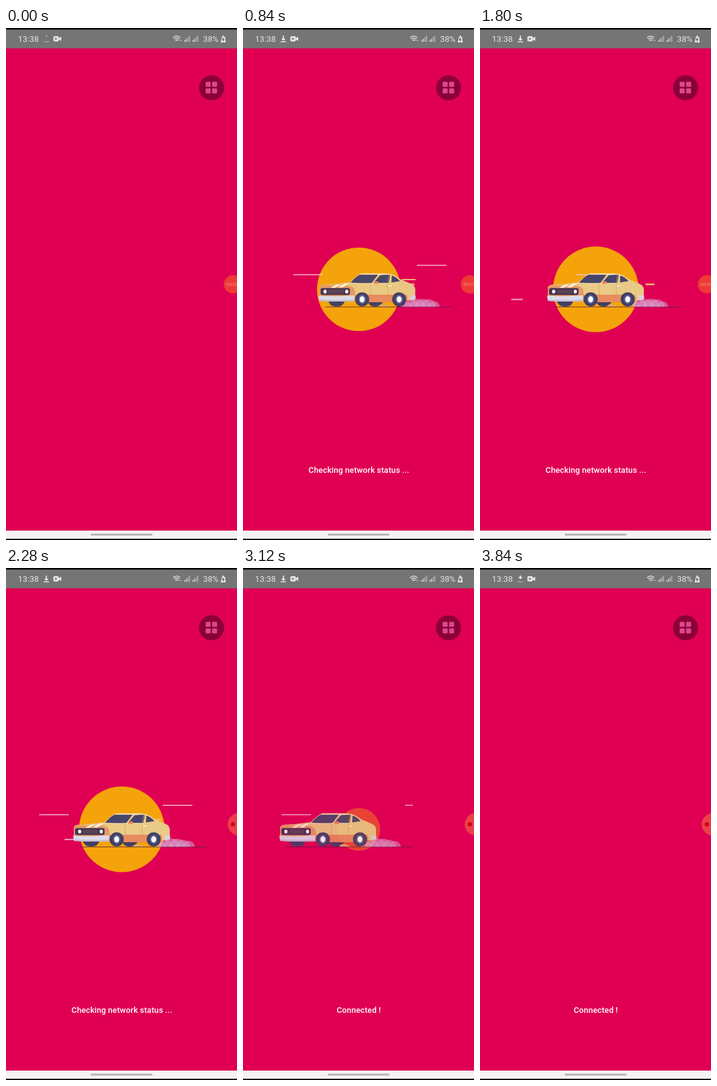
Animation, 368 px wide and 816 px high, one loop 3960 ms. Source, as an HTML page:

```html
<!DOCTYPE html>
<html lang="en">
<head>
<meta charset="utf-8">
<title>Network check</title>
<style>
  html, body { margin: 0; width: 100%; height: 100%; overflow: hidden; background: #e00053; }
  svg { display: block; width: 368px; height: 816px; }
  text { font-family: Roboto, sans-serif; }
  .note { font-size: 13px; font-weight: 500; letter-spacing: .08px; fill: #fff; text-anchor: middle; }
</style>
</head>
<body>
<svg viewBox="0 0 368 816">
  <defs>
    <clipPath id="compClip"><rect x="-60" y="330" width="379.5" height="170"/></clipPath>
    <clipPath id="arrowClip"><rect x="58" y="12" width="12" height="8.6"/></clipPath>
    <linearGradient id="bodyFill" x2="1">
      <stop offset="0" stop-color="#e6b06c"/><stop offset=".4" stop-color="#ebcb85"/><stop offset="1" stop-color="#e8c986"/>
    </linearGradient>
  </defs>
  <rect width="368" height="816" fill="#e00053"/>

  <rect width="368" height="32" fill="#757575"/>
  <rect width="368" height="2.5"/>
  <rect y="32" width="368" height="1" fill="#a8315a"/>
  <g fill="#e6e6e6">
    <text x="19" y="22" font-size="13.4">13:38</text>
    <text x="314" y="22" font-size="13.2">38%</text>
    <rect x="75.5" y="13" width="8.5" height="8.5" rx="1.8"/>
    <path d="M84 16l4-2v6.5l-4-2z"/>
    <path d="M78.3 15l3.6 2.2-3.6 2.2z" fill="#757575"/>
    <g id="bars"></g>
    <path d="M344 14h1v-2h2v2h2l1 9h-8z"/>
    <path d="M345.5 15.5l-1.8 3.7h2l-.6 3 3.4-4.2h-2.2l.8-2.5z" fill="#656565"/>
  </g>
  <path d="M266.5 15.2q5.5-4.6 11 0M268.4 17.5q3.6-3 7.2 0M270.3 19.7q1.7-1.4 3.4 0M276 20h.1M278.8 19.5v.5"
        fill="none" stroke="#e6e6e6" stroke-width="1.3" stroke-linecap="round"/>
  <rect id="tray" x="60" y="21.2" width="8.6" height="1.5" fill="#e8e8e8"/>
  <g clip-path="url(#arrowClip)">
    <path id="arrow" d="M63.5 12h1.7v5h2.6l-3.5 3.6-3.4-3.6h2.6z" fill="#eee"/>
  </g>

  <circle cx="327.5" cy="95.3" r="20" fill="#8b0038"/>
  <g id="grid" fill="#dc478b"></g>

  <circle id="sun" cx="184.5" cy="416.5" r="68.2" fill="#f5a30a"/>

  <g id="comp"><g clip-path="url(#compClip)">
    <g id="wind" stroke="#f3bdd0"></g>
    <path d="M118 444.6H320" stroke="#4a1f4a" opacity=".8"/>
    <g id="smoke" fill="#d7a5d0"></g>
    <path d="M122 434q2 10 14 10 11 0 13-10zM184 434q3 10 13 10 10 0 14-10z" fill="#413f63"/>
    <path d="M203 442q6-4 13 0l4 2h-17z" fill="#dda867"/>
    <path d="M108 413q2-4 9-4 19-1 40-4 9-10 18-14h37q16 1 26 10 14 5 20 9 3 3 3 8v10l-4 6h-50l-44-2-54-4z" fill="url(#bodyFill)"/>
    <path d="M172 392.5l4-1.5h36q12 0 20 6l-12-3z" fill="#f3deb0"/>
    <path d="M108 414q2-4 7-4l36 1q9 0 13 5l2 11h-58z" fill="#e59a66"/>
    <path d="M164 426l22-1h61l2 6-4 6h-60l-23-2z" fill="#e88b61"/>
    <path d="M126 414l9-4.5 8-1-10 5.5zM138 413.5l10-6 8-1-11 7z" fill="#fff3e1"/>
    <rect x="110" y="414.5" width="47" height="11" rx="3" fill="#453553"/>
    <rect x="122.5" y="417" width="24" height="6" rx="1" fill="#594055"/>
    <path d="M107 426.5q28 2 57-.5v9.5q-28 1-56-.5z" fill="#dddcec"/>
    <path d="M108 432.5q28 1.5 56 .5v2.5q-28 1-56-.5z" fill="#c3bfd8"/>
    <path d="M157.5 406.5q7-9 15-13.3h29l-10 13.3zM194 406.5l11-12.5q9-1 16-.5l-2.5 13zM223 405.5l.5-11q7 2 13 9z" fill="#47456b"/>
    <path d="M157 406.5q30 2 34 .5h28" stroke="#f6e3b7" fill="none"/>
    <rect x="195" y="403.7" width="7" height="4" rx="1.5" fill="#e98455"/>
    <path d="M218 411h5.5" stroke="#fff3dc" stroke-width="1.6"/>
    <path d="M219 394q-4 23-1 32M190 408v17" stroke="#c79d66" stroke-width=".7" fill="none"/>
    <rect x="253" y="426" width="8.5" height="7" rx="2" fill="#d7d2e4"/>
    <g id="wheels"></g>
  </g></g>

  <text id="check" class="note" x="184.5" y="709.3">Checking network status ...</text>
  <text id="done" class="note" x="184.5" y="709.3">Connected !</text>

  <g id="timer">
    <circle cx="361.5" cy="408.5" r="14.5" fill="#ee3a36"/>
    <text id="clock" x="351.5" y="411.3" font-size="7.5" fill="#f58f8c"></text>
  </g>
  <g id="recDot">
    <circle cx="371" cy="408.5" r="17.8" fill="#ec3f4a"/>
    <circle cx="361.5" cy="408.5" r="3.5" fill="#d50020"/>
  </g>

  <rect y="801" width="368" height="13.3" fill="#f6f2f4"/>
  <rect x="135" y="805.8" width="98.5" height="3.2" rx="1.6" fill="#b9b7b8"/>
  <rect y="814" width="368" height="2"/>
</svg>
<script>
const LOOP = 3960, STEP = 120;
const ENTER = 240, EXIT = 2760, WRAP = 144;
const $ = id => document.getElementById(id);

function add(parent, tag, attrs) {
  const el = document.createElementNS('http://www.w3.org/2000/svg', tag);
  for (const k in attrs) el.setAttribute(k, attrs[k]);
  return parent.appendChild(el);
}
const show = (el, o) => el.setAttribute('opacity', o);
const moveTo = (el, x, y) => el.setAttribute('transform', `translate(${x} ${y})`);
const progress = (t, from, span) => Math.max(0, Math.min(1, (t - from) / span));

// A gust is visible while the wrapped drift lies in [from, to]
function gust(y, x, len, from, to, weight) {
  const el = add($('wind'), 'path', { d: `M0 ${y}h${len}`, 'stroke-width': weight });
  return { el, x, from, to };
}
const gusts = [
  gust(393.3, 66.5, 47, -42, 102, 1.4),
  gust(378.3, 263.5, 47, -42, 102, 1.4),
  gust(401, 239.5, 22, -20, 14, 2),
  gust(408.5, 245.5, 14, -10, 30, 2.6),
  gust(408.5, 177, 14, 70, 100, 2.6),
  gust(432.6, -37, 18, 86, 136, 1.8)
];
for (const g of gusts.slice(2, 5)) g.el.setAttribute('stroke', '#f0bf7e');

const puffs = Array.from({ length: 6 }, (_, i) => add($('smoke'), 'path', { opacity: .55 }));

for (const cx of [176, 235]) {
  const ring = (rx, ry, fill) => add($('wheels'), 'ellipse', { cx: cx + .3, cy: 432.5, rx, ry, fill });
  ring(11.2, 11.2, '#413f63');
  ring(6, 7.2, '#5a6694');
  ring(3.9, 5, '#fff');
}
for (const cx of [117.3, 151.8])
  add($('wheels'), 'ellipse', { cx, cy: 420, rx: 2.5, ry: 3.1, fill: '#fff' });

for (let i = 0; i < 4; i++) {
  add($('grid'), 'rect', { x: 318 + i % 2 * 10.3, y: 85.7 + (i >> 1) * 10.5, width: 8, height: 8, rx: 1.5 });
  for (const x of [284, 297])
    add($('bars'), 'rect', { x: x + i * 2.6, y: 19.5 - i * 2.4, width: 1.3, height: 2.5 + i * 2.4, opacity: i > 1 ? .65 : 1 });
}

function drawDownload(t) {
  const p = progress(t % 1200, 0, 400);
  moveTo($('arrow'), 0, 7 * (p - 1));
  show($('tray'), p < .9 ? .4 : 1);
}

function drawScene(t) {
  const rest = 1 - progress(t, ENTER, 840);
  const leave = progress(t, EXIT, 720);
  moveTo($('comp'), 165 * rest ** 2 - 196 * leave ** 2, 0);
  show($('comp'), (1 - rest ** 3) * (1 - leave ** 3));
  $('sun').setAttribute('r', 68.2 * (1 - rest ** 3) * (1 - leave));
  show($('sun'), 1 - leave ** .75);
}

function drawWind(t) {
  // The drift slows as the car leaves
  const d = .0905 * (Math.min(t, 2640) - 840) + .052 * Math.max(0, t - 2640);
  for (const { el, x, from, to } of gusts) {
    const u = ((d - from) % WRAP + WRAP) % WRAP + from;
    show(el, u < to ? 1 : 0);
    moveTo(el, x + u, 0);
  }
}

function drawSmoke(t) {
  puffs.forEach((el, i) => {
    const r = 6 + 7 * Math.sin((i + 1) * Math.PI / 7) + .5 * Math.sin(t / 140 + i * 2);
    el.setAttribute('d', `M${246 + 9 * i - r} 444.3a${r} ${r} 0 0 1 ${2 * r} 0z`);
  });
}

const fadeText = (el, t, from, to) => show(el, t < to ? progress(t, from, 240) : 0);

function draw(t) {
  drawDownload(t);
  drawScene(t);
  drawWind(t);
  drawSmoke(t);
  fadeText($('check'), t, 240, 2520);
  fadeText($('done'), t, 2760, LOOP);
  const counting = t < 2280;
  show($('timer'), +counting);
  show($('recDot'), +!counting);
  $('clock').textContent = '00:0' + (2 + Math.floor(Math.min(t + 680, 2000) / 1000));
}

const start = performance.now();
function tick() {
  const t = (performance.now() - start) % LOOP;
  draw(Math.floor(t / STEP) * STEP);
  requestAnimationFrame(tick);
}
tick();
</script>
</body>
</html>
```
